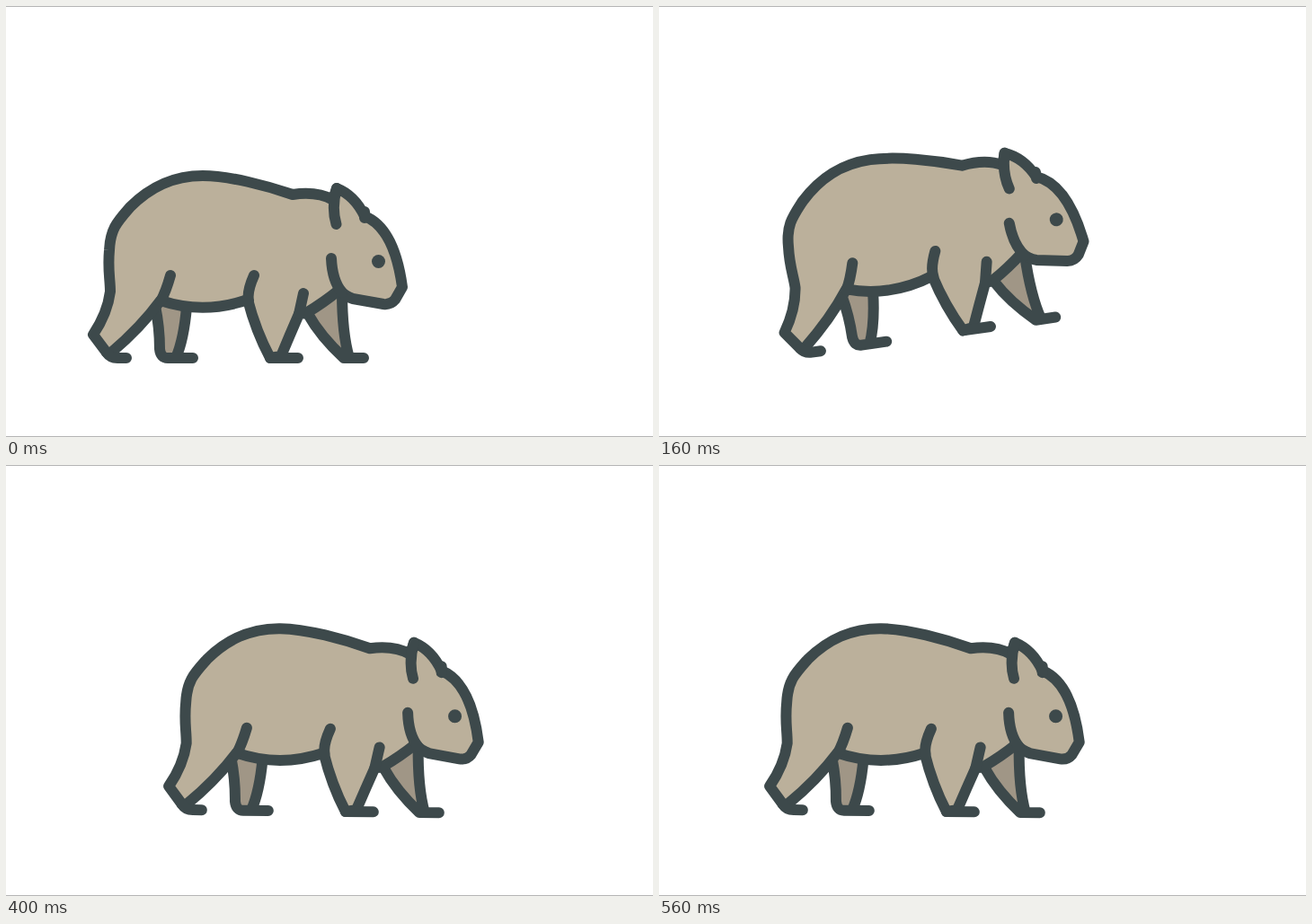
Write an HTML page that moves like this. It is 720 by 480 pixels and loops after 640 ms.

```html
<!DOCTYPE html>
<html lang="en">
<head>
<meta charset="utf-8">
<title>Hopping wombat</title>
<style>
  html, body { margin: 0; width: 100%; height: 100%; overflow: hidden; background: #fff; }
  svg { display: block; width: 100%; height: 100%; }
  #wombat { stroke: #3d494b; stroke-width: 12; stroke-linecap: round; stroke-linejoin: round; fill: none; }
  #wombat .coat { fill: #bbb09b; }
  #wombat .shade { fill: #a09686; }
  #wombat .eye { fill: #3d494b; stroke: none; }
</style>
</head>
<body>
<svg viewBox="0 0 720 480">
  <path d="M0 .5H720M0 479.5H720" stroke="#b4b4b4"/>
  <g id="wombat">
    <!-- far legs -->
    <path class="shade" d="M166 334Q171 358 171 382Q172 392 180 392H208H189Q198 371 201 335"/>
    <path class="shade" d="M336 343Q350 368 376 392H398H382Q374 365 374 318"/>
    <!-- body and head -->
    <path class="coat" d="M97 366Q113 342 116 318C116 304 113 294 115 272C116 248 124 240 138 224C160 202 185 189 219 189C248 189 290 200 319 210Q346 206 364 216L368 203Q388 211 399 234Q432 247 441 313L433 327Q428 333 420 332L386 326Q377 323 371 316Q354 330 334 342L326 343Q316 366 306 390L294 392Q278 362 269 327Q220 344 172 328Q150 358 117 386L112 386Z"/>
    <!-- near feet, leg tops, cheek and ear -->
    <path d="M112 386Q116 392 124 392H134M294 392H325"/>
    <path d="M183 300Q178 318 172 329M276 300Q268 318 270 328M331 320L326 343"/>
    <path d="M362 281Q363 306 374 319M368 203Q362 225 367.500 243M399 229V236"/>
    <circle class="eye" cx="414.500" cy="284.500" r="7.500"/>
  </g>
</svg>
<script>
  const STEP = 80, STEPS = 8;

  // turning points of the hop, one per change of direction
  const keys = [
    { at: 0, x: 0, y: 0, tilt: 0 },
    { at: 1, x: 0, y: 0, tilt: -8.2 },
    { at: 2, x: 30, y: -26, tilt: -8.2 },
    { at: 4, x: 72.3, y: -19.3, tilt: 0.65 },
    { at: 5, x: 85, y: -6.3, tilt: 0.65 },
    { at: 7, x: 27, y: -6.3, tilt: 0.65 }
  ];
  const wombat = document.getElementById("wombat");

  function poseAt(step) {
    const next = keys.findIndex(key => key.at >= step);
    const b = keys[next], a = keys[Math.max(next - 1, 0)];
    const u = (step - a.at) / (b.at - a.at || 1);
    const mix = name => a[name] + (b[name] - a[name]) * u;
    return { x: mix("x"), y: mix("y"), tilt: mix("tilt") };
  }

  function draw(ms) {
    const { x, y, tilt } = poseAt(Math.floor(ms / STEP) % STEPS);
    wombat.setAttribute("transform", `translate(${x} ${y}) rotate(${tilt} 269 290)`);
  }

  const start = performance.now();
  function tick() {
    draw(performance.now() - start);
    requestAnimationFrame(tick);
  }
  tick();
</script>
</body>
</html>
```
